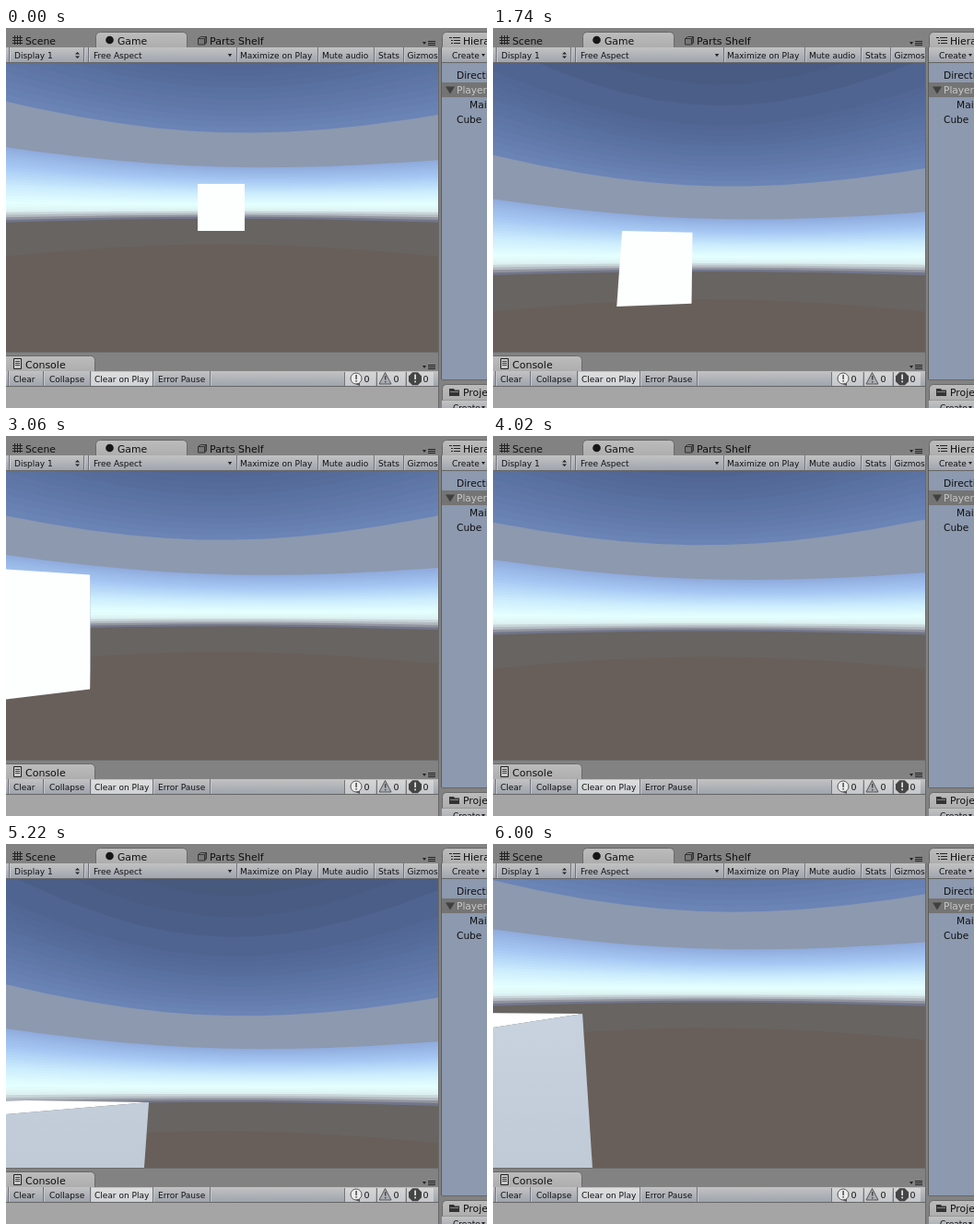
Animation, 522 px wide and 412 px high, one loop 6030 ms. Source, as an HTML page with a canvas:

```html
<!DOCTYPE html>
<html lang="en">
<head>
<meta charset="utf-8">
<title>Game view</title>
<style>
html, body { margin: 0; width: 100%; height: 100%; overflow: hidden; background: #828282; }
canvas { display: block; width: 522px; height: 412px; }
</style>
</head>
<body>
<canvas id="stage" width="522" height="412"></canvas>
<script>
const ctx = document.getElementById('stage').getContext('2d');
const LOOP = 6030, STEP = 30;
const CX = 233.5, CY = 194.5, FOCAL = 271;
const VIEW = { x: 0, y: 38, w: 469, h: 313 };
const RAD = Math.PI / 180;
const FONT = '"DejaVu Sans", sans-serif';

// time, camera x, y, z, yaw, pitch, sky tilt
const KEYS = [
  [0, 0, 0, -5.81, 0, 0, 1],
  [660, 0, 0, -5.81, 0, 0, 1],
  [1260, -.03, .01, -5.2, 4, 3.5, 1],
  [1740, -.116, .1065, -4.178, 13.1, 11.8, 1],
  [2550, .3, .145, -3.3, 23, 1.3, .4],
  [3060, .514, .149, -2.97, 27.4, -.1, 0],
  [3810, .95, .155, -2.5, 35, .4, -.2],
  [4020, 1.02, .16, -2.4, 34, 1, -.2],
  [4470, 1.2, .25, -1.95, 15, 13, .7],
  [4710, 1.289, .374, -1.647, 0, 26.6, 1],
  [5220, 1.369, .573, -.915, -16.1, 14.9, 1],
  [6000, 1.208, .609, -.642, -5, -7.4, 1]
];

// elevation in degrees, red, green, blue
const SKY = [
  [60, 66, 83, 115], [45, 70, 88, 124], [36, 75, 94, 136], [29, 82, 104, 150],
  [22, 95, 119, 167], [16.7, 108, 134, 184], [9.2, 143, 171, 221], [6.2, 166, 200, 243],
  [3.1, 205, 237, 253], [.7, 228, 255, 255], [-.6, 222, 243, 243],
  [-1.5, 180, 187, 194], [-2.1, 134, 134, 145], [-2.6, 97, 105, 136]
];
const rgb = c => `rgb(${c.map(Math.round).join(',')})`;

function skyColor(e) {
  let i = 1;
  while (i < SKY.length - 1 && SKY[i][0] > e) i++;
  const a = SKY[i - 1], b = SKY[i], k = (a[0] - e) / (a[0] - b[0]);
  return rgb([1, 2, 3].map(n => a[n] + (b[n] - a[n]) * k));
}

function makeBands() {
  const list = [];
  const run = (from, to, n) => {
    const d = (to - from) / n;
    for (let i = 0; i < n; i++) list.push([from + d * i, skyColor(from + d * (i + .5))]);
  };
  run(62, 30, 8);
  run(30, 16.7, 12);
  list.push([16.7, '#8c99af']);
  run(9.2, -2.6, 27);
  list.push([-2.6, '#686461'], [-8.4, '#685f5a']);
  return list;
}
const BANDS = makeBands();

// Monotone cubic interpolation through the keys
function sample(t, n) {
  const last = KEYS.length - 1;
  if (t >= KEYS[last][0]) return KEYS[last][n];
  let i = 0;
  while (KEYS[i + 1][0] <= t) i++;
  const rate = j => (KEYS[j + 1][n] - KEYS[j][n]) / (KEYS[j + 1][0] - KEYS[j][0]);
  const slope = j => {
    if (j === 0) return rate(0);
    if (j === last) return rate(last - 1);
    const a = rate(j - 1), b = rate(j);
    return a * b <= 0 ? 0 : 2 * a * b / (a + b);
  };
  const a = KEYS[i], b = KEYS[i + 1], h = b[0] - a[0], s = (t - a[0]) / h;
  const s2 = s * s, s3 = s2 * s;
  return a[n] * (2 * s3 - 3 * s2 + 1) + b[n] * (3 * s2 - 2 * s3) +
    h * (slope(i) * (s3 - 2 * s2 + s) + slope(i + 1) * (s3 - s2));
}

const pitched = (x, y, z, p) => [x, y * Math.cos(p) - z * Math.sin(p), z * Math.cos(p) + y * Math.sin(p)];
const project = ([x, y, z]) => [CX + FOCAL * x / z, CY - FOCAL * y / z];

function drawSky(cam) {
  ctx.fillStyle = '#425370';
  ctx.fillRect(VIEW.x, VIEW.y, VIEW.w, VIEW.h);
  const facet = 7.5, shift = ((cam.yaw % facet) + facet) % facet;
  for (const [e, color] of BANDS) {
    const lean = .027 * Math.max(0, Math.min(1, e / 8)) * (e > 14 ? cam.tilt : 1);
    ctx.beginPath();
    ctx.moveTo(-900, 900);
    for (let az = -75 - shift + facet; az <= 75; az += facet) {
      const el = (e - lean * az) * RAD, a = az * RAD;
      const v = pitched(Math.cos(el) * Math.sin(a), Math.sin(el), Math.cos(el) * Math.cos(a), cam.pitch);
      v[2] = Math.max(v[2], .03);
      ctx.lineTo(...project(v));
    }
    ctx.lineTo(1400, 900);
    ctx.fillStyle = color;
    ctx.fill();
  }
}

function clipNear(pts, near) {
  const out = [];
  pts.forEach((a, i) => {
    const b = pts[(i + 1) % pts.length];
    if (a[2] >= near) out.push(a);
    if ((a[2] >= near) !== (b[2] >= near)) {
      const k = (near - a[2]) / (b[2] - a[2]);
      out.push(a.map((v, n) => v + (b[n] - v) * k));
    }
  });
  return out;
}

function drawFace(cam, corners, fill) {
  const c = Math.cos(cam.yaw * RAD), s = Math.sin(cam.yaw * RAD);
  const pts = clipNear(corners.map(([x, y, z]) => {
    const dx = x - cam.x, dz = z - cam.z;
    return pitched(dx * c - dz * s, y - cam.y, dx * s + dz * c, cam.pitch);
  }), .04).map(project);
  if (pts.length < 3) return;
  ctx.beginPath();
  pts.forEach(p => ctx.lineTo(...p));
  ctx.closePath();
  ctx.fillStyle = fill;
  ctx.fill();
}

function drawCube(cam) {
  const h = .5;
  if (cam.z < -h) drawFace(cam, [[-h, h, -h], [h, h, -h], [h, -h, -h], [-h, -h, -h]], '#fdffff');
  if (cam.y > h) drawFace(cam, [[-h, h, -h], [-h, h, h], [h, h, h], [h, h, -h]], '#fff');
  if (cam.x > h) {
    const g = ctx.createLinearGradient(0, 180, 0, 351);
    g.addColorStop(0, '#c8d3df');
    g.addColorStop(1, '#bfcad6');
    drawFace(cam, [[h, h, -h], [h, h, h], [h, -h, h], [h, -h, -h]], g);
  }
}

function rect(x, y, w, h, color) {
  ctx.fillStyle = color;
  ctx.fillRect(x, y, w, h);
}
function text(s, x, y, size, color = '#101010') {
  ctx.font = `${size}px ${FONT}`;
  ctx.fillStyle = color;
  ctx.fillText(s, x, y);
}
function poly(pts, color, stroke) {
  ctx.beginPath();
  pts.forEach(p => ctx.lineTo(...p));
  ctx.closePath();
  if (color) { ctx.fillStyle = color; ctx.fill(); }
  if (stroke) { ctx.strokeStyle = stroke; ctx.lineWidth = 1; ctx.stroke(); }
}
function disc(x, y, r, color, stroke) {
  ctx.beginPath();
  ctx.arc(x, y, r, 0, 7);
  ctx.fillStyle = color;
  ctx.fill();
  if (stroke) { ctx.strokeStyle = stroke; ctx.lineWidth = 1; ctx.stroke(); }
}
function shade(x, y, w, h, top, bottom) {
  const g = ctx.createLinearGradient(0, y, 0, y + h);
  g.addColorStop(0, top);
  g.addColorStop(1, bottom);
  rect(x, y, w, h, g);
}
function tab(x, y, w, h) {
  ctx.beginPath();
  ctx.moveTo(x, y + h);
  ctx.lineTo(x, y + 5);
  ctx.quadraticCurveTo(x, y, x + 5, y);
  ctx.lineTo(x + w - 5, y);
  ctx.quadraticCurveTo(x + w, y, x + w, y + 5);
  ctx.lineTo(x + w, y + h);
  const g = ctx.createLinearGradient(0, y, 0, y + h);
  g.addColorStop(0, '#bcbcbc');
  g.addColorStop(1, '#adadad');
  ctx.fillStyle = g;
  ctx.fill();
  ctx.strokeStyle = '#686868';
  ctx.lineWidth = 1;
  ctx.stroke();
}
function toolbar(x, y, w, h, seams) {
  shade(x, y, w, h, '#c2c2c2', '#9da3ad');
  rect(x, y + h - 1, w, 1, '#666');
  seams.forEach(s => {
    rect(s, y, 1, h - 1, '#70747c');
    rect(s + 1, y, 1, h - 1, '#c4c7cc');
  });
}
const down = (x, y, r, color = '#222') => poly([[x - r, y - r / 2], [x + r, y - r / 2], [x, y + r]], color);
function menu(x, y) {
  down(x, y, 2);
  for (let i = 0; i < 3; i++) rect(x + 4, y - 2 + i * 2, 8, 1, '#222');
}

function drawTopBar() {
  rect(0, 0, 470, 21, '#828282');
  tab(97.5, 4.5, 99, 17);
  for (let i = 0; i < 3; i++) {
    rect(9 + i * 3, 8, 1, 10, '#222');
    rect(7, 10 + i * 3, 11, 1, '#222');
  }
  text('Scene', 21, 18, 10.8);
  disc(112.5, 13, 4.3, '#161616');
  text('Game', 121, 18, 10.8);
  poly([[208.5, 11.5], [211.5, 9.5], [217.5, 9.5], [215.5, 11.5]], '#858585', '#333');
  poly([[208.5, 11.5], [215.5, 11.5], [215.5, 18], [208.5, 18]], '#777', '#333');
  poly([[215.5, 11.5], [217.5, 9.5], [217.5, 16], [215.5, 18]], '#555', '#333');
  text('Parts Shelf', 221, 18, 11);
  menu(454, 16);
  toolbar(0, 21, 469, 17, [3, 84, 89, 250, 338, 399, 431]);
  text('Display 1', 9, 33, 9);
  poly([[75, 28.5], [80, 28.5], [77.5, 26]], '#222');
  poly([[75, 30.5], [80, 30.5], [77.5, 33]], '#222');
  text('Free Aspect', 95, 33, 9);
  down(243, 29, 2.2);
  text('Maximize on Play', 254, 33, 9);
  text('Mute audio', 343, 33, 9);
  text('Stats', 404, 33, 9);
  text('Gizmos', 435.5, 33, 9);
}

function drawConsole() {
  rect(0, 351, 470, 61, '#828282');
  rect(0, 351, 470, 1, '#6c6c6c');
  tab(-5.5, 355.5, 102, 17);
  poly([[8.5, 358.5], [16.5, 358.5], [16.5, 369.5], [8.5, 369.5]], '#c8c8c8', '#222');
  for (let i = 0; i < 3; i++) rect(10, 361 + i * 2, 5, 1, '#444');
  text('Console', 21, 369, 11);
  menu(454, 367);
  toolbar(0, 372, 469, 17, [2, 40, 91, 159, 221]);
  shade(93, 373, 66, 15, '#dedede', '#cfd2d6');
  text('Clear', 8, 384, 9);
  text('Collapse', 47, 384, 9);
  text('Clear on Play', 96, 384, 9);
  text('Error Pause', 165, 384, 9);
  for (const [x, w] of [[368, 33], [403, 30], [435, 29]]) {
    shade(x, 373, w, 15, '#d6d6d6', '#c4c7cc');
    rect(x - 1, 373, 1, 15, '#777');
  }
  disc(380, 380, 6, '#ececec', '#555');
  poly([[379, 386], [384, 385], [384, 388]], '#555');
  rect(379.3, 376, 1.6, 5, '#555');
  rect(379.3, 382, 1.6, 1.6, '#555');
  poly([[411.5, 373.5], [418, 386], [405, 386]], '#a9adb3', '#555');
  rect(411, 377, 1.4, 4.5, '#444');
  rect(411, 383, 1.4, 1.4, '#444');
  const oct = [];
  for (let i = 0; i < 8; i++) {
    const a = (i + .5) * Math.PI / 4;
    oct.push([444 + 7.6 * Math.cos(a), 380.3 + 7.6 * Math.sin(a)]);
  }
  poly(oct, '#444');
  rect(443.2, 375.5, 1.8, 5.5, '#ddd');
  rect(443.2, 382.5, 1.8, 1.8, '#ddd');
  [388.5, 420.5, 452.5].forEach(x => text('0', x, 384, 9.5));
  rect(0, 389, 470, 23, '#a5a5a5');
}

function drawSide() {
  rect(469, 0, 53, 412, '#828282');
  rect(469, 21, 1, 391, '#686868');
  tab(473.5, 4.5, 60, 17);
  rect(481, 10, 3, 1, '#222');
  rect(485, 10, 8, 1, '#222');
  for (let i = 1; i < 3; i++) {
    rect(483, 10 + i * 3, 2, 1, '#222');
    rect(486, 10 + i * 3, 7, 1, '#222');
  }
  text('Hierarchy', 496, 18, 10.8);
  toolbar(473, 21, 49, 17, []);
  text('Create', 484, 33, 9);
  down(518, 29, 2);
  rect(473, 38, 49, 343, '#8c99af');
  rect(473, 59, 49, 16, '#747474');
  text('Directional Light', 489, 55, 10.6);
  text('Player', 489, 71, 10.6, '#c8c8c8');
  poly([[477, 63.5], [487, 63.5], [482, 71.5]], '#404040');
  text('Main Camera', 503, 87, 10.6);
  text('Cube', 489, 103, 10.6);
  rect(472, 21, 1, 360, '#5c5c5c');
  rect(473, 381, 49, 1, '#666');
  tab(473.5, 386.5, 60, 17);
  poly([[481, 391], [486, 391], [487, 392.5], [492, 392.5], [492, 399], [481, 399]], '#333');
  rect(482, 394, 9, 1, '#888');
  text('Project', 496, 399, 10.8);
  toolbar(473, 404, 49, 17, []);
  text('Create', 485, 415, 9);
  down(518, 411, 2);
}

function draw(t) {
  const at = n => sample(t, n);
  const cam = { x: at(1), y: at(2), z: at(3), yaw: at(4), pitch: at(5) * RAD, tilt: at(6) };
  ctx.save();
  ctx.beginPath();
  ctx.rect(VIEW.x, VIEW.y, VIEW.w, VIEW.h);
  ctx.clip();
  drawSky(cam);
  drawCube(cam);
  ctx.restore();
  drawTopBar();
  drawConsole();
  drawSide();
}

const start = performance.now();
function frame() {
  const t = (performance.now() - start) % LOOP;
  draw(Math.floor(t / STEP) * STEP);
  requestAnimationFrame(frame);
}
frame();
</script>
</body>
</html>
```
